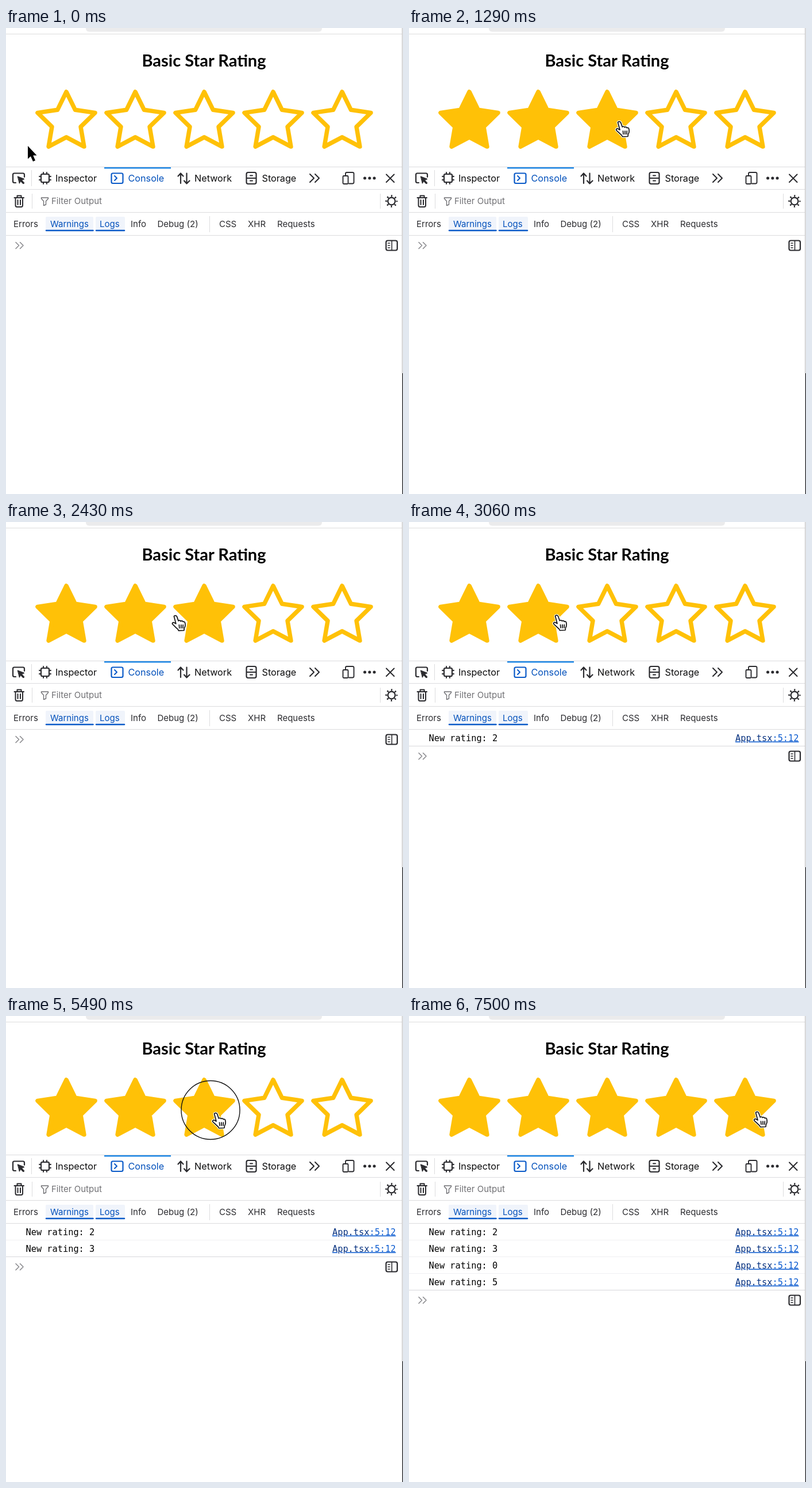
An HTML page for the animation above (8 s loop, 691 px wide and 810 px high).

```html
<!DOCTYPE html>
<html lang="en">
<head>
<meta charset="utf-8">
<title>Basic Star Rating</title>
<style>
  html, body { margin: 0; width: 100%; height: 100%; overflow: hidden; background: #fff; }
  svg { display: block; }
  text { font: 15px Inter, sans-serif; fill: #2b2b2f; white-space: pre; }
  .title { font: 700 29px Lato, sans-serif; fill: #000; text-anchor: middle; }
  .tab { font-size: 16.2px; fill: #0c0c0d; }
  .active { fill: #0250bb; }
  .hint { fill: #707074; }
  .log text { font: 15.3px "DejaVu Sans Mono", monospace; fill: #000; }
  .log .link { text-anchor: end; fill: #0b5bd0; text-decoration: underline; }
  .log .file { fill: #07317f; }
  .icon { fill: none; stroke: #2b2b2f; stroke-width: 2.2; stroke-linecap: round; stroke-linejoin: round; }
  .rule { stroke: #dcdcde; fill: none; }
  .star { stroke: #ffc107; stroke-width: 7.5; stroke-linejoin: round; }
</style>
</head>
<body>
<svg id="stage" width="691" height="810" viewBox="0 0 691 810">
  <rect width="691" height="810" fill="#fff"/>
  <path d="M139 0H550Q550 6.5 544 6.5H145Q139 6.5 139 0Z" fill="#ebebec"/>
  <path class="rule" d="M0 10.5H690"/>
  <text class="title" x="344.5" y="67">Basic Star Rating</text>
  <g id="stars"></g>

  <path class="rule" d="M0 241.5H690M0 280.5H690M0 320.5H690M0 360.5H690M44.5 247V275M45.5 288V314M651.5 288V314M354.5 327V355"/>
  <path d="M171 242H287V244.5H171Z" fill="#1f87e5"/>
  <text class="tab" x="86" y="267">Inspector</text>
  <text class="tab active" x="212.5" y="267">Console</text>
  <text class="tab" x="328" y="267">Network</text>
  <text class="tab" x="445.5" y="267">Storage</text>

  <g class="icon">
    <path d="M17 269H14.5Q12 269 12 266.500V255Q12 252.500 14.500 252.500H29.500Q32 252.500 32 255V259"/>
    <path d="M20.500 258L32 262.500 27.500 264.500 32 269.500 30 271 25.500 266.500 23.500 270Z" fill="#2b2b2f" stroke-width="1"/>
    <rect x="61" y="254" width="14" height="14" rx="2"/>
    <path d="M65 251V254M71 251V254M65 268V271M71 268V271M58 258H61M58 264H61M75 258H78M75 264H78" stroke-width="2"/>
    <g stroke="#0a5ac8">
      <rect x="183.500" y="252.500" width="20" height="17.500" rx="2.500"/>
      <path d="M189 257L193 261 189 265" stroke-width="2"/>
    </g>
    <path d="M304 270V252.500M299.500 257.500L304 252.500 308.500 257.500M314.500 252.500V270M310 265.500L314.500 270.500 319.500 265.500"/>
    <rect x="418.500" y="251" width="17" height="20" rx="3"/>
    <path d="M419 261H435M425 256.500H429M425 265.500H429" stroke-width="2"/>
    <path d="M529 254L536 261 529 268M538 254L545 261 538 268" stroke-width="2"/>
    <path d="M591 256V253Q591 251 593 251H603Q605.500 251 605.500 253V268Q605.500 270.500 603 270.500H597" stroke-width="1.900"/>
    <rect x="586.500" y="257" width="9" height="14" rx="1.500" stroke-width="1.900"/>
    <path d="M624.500 261H624.600M632.800 261H632.900M641 261H641.100" stroke-width="5"/>
    <path d="M662 254.500L675.500 268M675.500 254.500L662 268" stroke-width="2"/>
    <path d="M14.500 295H31M19.500 294.500V291.500H26.500V294.500M16.500 296V308Q16.500 311 19 311H26.500Q29 311 29 308V296M20.500 299V307M25 299V307" stroke-width="2"/>
    <path d="M61.500 295H73.500V296.500L69.500 301V307L65.500 308.500V301L61.500 296.500Z" stroke="#707074" stroke-width="1.400"/>
    <circle cx="671" cy="301" r="6.300"/>
    <circle cx="671" cy="301" r="9" stroke-width="3.500" stroke-dasharray="2.200 4.869" stroke-dashoffset="1.100" stroke-linecap="butt"/>
  </g>

  <text class="hint" x="79" y="306">Filter Output</text>
  <path d="M69 353V330Q69 328 71 328H150Q152 328 152 330V353ZM156 353V330Q156 328 158 328H205Q207 328 207 330V353Z" fill="#f0f4fb"/>
  <path d="M70 352H151.500M157 352H206" stroke="#0a5ac8" stroke-width="2.600" stroke-linecap="round"/>
  <text x="13" y="346">Errors</text>
  <text class="active" x="77" y="346">Warnings</text>
  <text class="active" x="163" y="346">Logs</text>
  <text x="217" y="346">Info</text>
  <text x="263.500" y="346">Debug (2)</text>
  <text x="371" y="346">CSS</text>
  <text x="421" y="346">XHR</text>
  <text x="472" y="346">Requests</text>

  <g id="logs"></g>
  <g id="prompt" class="icon">
    <path d="M17 372.500L22.500 378 17 383.500M24.500 372.500L30 378 24.500 383.500" stroke="#8a8a8e" stroke-width="1.600"/>
    <rect x="661.500" y="369.500" width="19.500" height="17" rx="3"/>
    <path d="M671.500 370V386M665 374H668M665 378H668M665 382H668" stroke-width="1.600"/>
  </g>

  <path d="M689.500 0V810" stroke="#c4c4c6"/>
  <path d="M690.500 0V600" stroke="#e9e9ea"/>
  <path d="M690.500 600V810" stroke="#17191c"/>

  <circle id="ring" fill="none" stroke="#111" stroke-width="1.400"/>
  <g id="arrow" stroke-linejoin="round">
    <path d="M0 0V22.500L5 18 9 27 13 25.300 9.200 16.500H15.500Z" stroke="#fff" stroke-width="2.500" paint-order="stroke"/>
  </g>
  <g id="hand" stroke-linejoin="round" stroke-linecap="round">
    <path id="palm" d="M-2.500 2C-1.500 .2 1.800 .2 2.600 2.500L5.300 10C6.500 8.800 8.600 9 9.300 10.700 10.500 9.500 12.700 9.900 13.300 11.600 14.600 10.800 16.500 11.700 16.800 13.500 17.500 17 17.300 20 15.500 22.500L15 26.500 5.500 27 4.300 24.500C1 22 -1.500 18.800 -4.500 16.300 -6.600 14.300 -4.300 12 -2 13.200L1 15Z" fill="#fff" stroke="#fff" stroke-width="4"/>
    <use href="#palm" id="outline"/>
    <path d="M-2.500 2C-1.500 .2 1.800 .2 2.600 2.500L5.300 10C6.500 8.800 8.600 9 9.300 10.700 10.500 9.500 12.700 9.900 13.300 11.600 14.600 10.800 16.500 11.700 16.800 13.500 17.500 17 17.300 20 15.500 22.500L15 26.500 5.500 27 4.300 24.500C1 22 -1.500 18.800 -4.500 16.300 -6.600 14.300 -4.300 12 -2 13.200L1 15ZM6.500 17L7 22.500M10 17V22.500M13.300 17L13 22.500" fill="#fff" stroke="#111" stroke-width="1.700"/>
  </g>
</svg>
<script>
const LOOP = 8000, STEP = 30, CELL = 120, ROW = 29, LEFT = 45;
const RING_TIME = 120, RING_SIZE = 51;

// Pointer tip: [time, x, y]
const path = [
  [0, 38, 205], [300, 135, 196], [630, 226, 181], [900, 226, 181],
  [1290, 366, 162], [1710, 494, 169], [1860, 560, 173], [2010, 606, 169], [2080, 606, 169],
  [2520, 257, 161], [2580, 257, 161.500], [3420, 257, 161.500], [3510, 256, 167],
  [3990, 256, 167], [4420, 365, 168], [6300, 365, 168], [6630, 485, 162],
  [6960, 606, 163], [7290, 606, 163], [7500, 606, 166], [LOOP, 606, 166],
];
const clicks = [
  { down: 2790, logged: 3060, rating: 2 },
  { down: 4530, logged: 4800, rating: 3 },
  { down: 5490, logged: 5670, rating: 0 },
  { down: 7170, logged: 7380, rating: 5 },
];

const $ = id => document.getElementById(id);
const show = (node, on) => node.setAttribute("visibility", on ? "visible" : "hidden");
const move = (node, x, y) => node.setAttribute("transform", `translate(${x} ${y})`);

$("outline").remove();
const starShape = "M60 10L75.450 41.300 110 46.350 85 70.700 90.900 105.100 60 88.850 29.100 105.100 35 70.700 10 46.350 44.550 41.300Z";
$("stars").innerHTML = [0, 1, 2, 3, 4].map(i =>
  `<path class="star" d="${starShape}" transform="translate(${LEFT + i * CELL} 101)"/>`).join("");
$("logs").innerHTML = clicks.map(({ rating }, i) =>
  `<g class="log" transform="translate(0 ${i * ROW})">
    <text x="34.500" y="380.500">New rating: ${rating}</text>
    <text class="link" x="678.500" y="380.500"><tspan class="file">App.tsx</tspan>:5:12</text>
    <path d="M0 389.500H689"/>
  </g>`).join("");
const stars = [...$("stars").children], logs = [...$("logs").children];

// Smooth interpolation that rests at holds and turning points
function slope(i, axis) {
  const a = path[i - 1], b = path[i], c = path[i + 1];
  if (!a || !c || (b[axis] - a[axis]) * (c[axis] - b[axis]) <= 0) return 0;
  return (c[axis] - a[axis]) / (c[0] - a[0]);
}
function pointer(t, axis) {
  const i = path.findIndex((key, n) => t < path[n + 1][0]);
  const a = path[i], b = path[i + 1], span = b[0] - a[0], u = (t - a[0]) / span;
  const ease = u * u * (3 - 2 * u);
  return a[axis] + (b[axis] - a[axis]) * ease
    + span * u * (1 - u) * (slope(i, axis) * (1 - u) - slope(i + 1, axis) * u);
}

function draw(now) {
  const t = Math.floor(now % LOOP / STEP) * STEP;
  const x = pointer(t, 1), y = pointer(t, 2);
  const hovered = Math.max(0, Math.floor((x - LEFT) / CELL) + 1);
  const cleared = hovered === 3 && t >= clicks[2].logged;
  const filled = cleared ? 0 : hovered;
  stars.forEach((star, i) => star.setAttribute("fill", i < filled ? "#ffc107" : "#fff"));

  const count = clicks.filter(click => t >= click.logged).length;
  logs.forEach((log, i) => {
    show(log, i < count);
    log.lastElementChild.setAttribute("stroke", i === count - 1 ? "#d7d7db" : "#f0f0f2");
  });
  move($("prompt"), 0, count * ROW);

  move($("hand"), x, y);
  move($("arrow"), x, y);
  show($("hand"), hovered > 0);
  show($("arrow"), hovered === 0);

  const click = clicks.find(({ down }) => t >= down && t < down + RING_TIME);
  show($("ring"), click);
  if (click) {
    move($("ring"), x - 9, y - 4.500);
    $("ring").setAttribute("r", RING_SIZE * (1 - (t - click.down) / RING_TIME));
  }
  requestAnimationFrame(draw);
}
requestAnimationFrame(draw);
</script>
</body>
</html>
```
